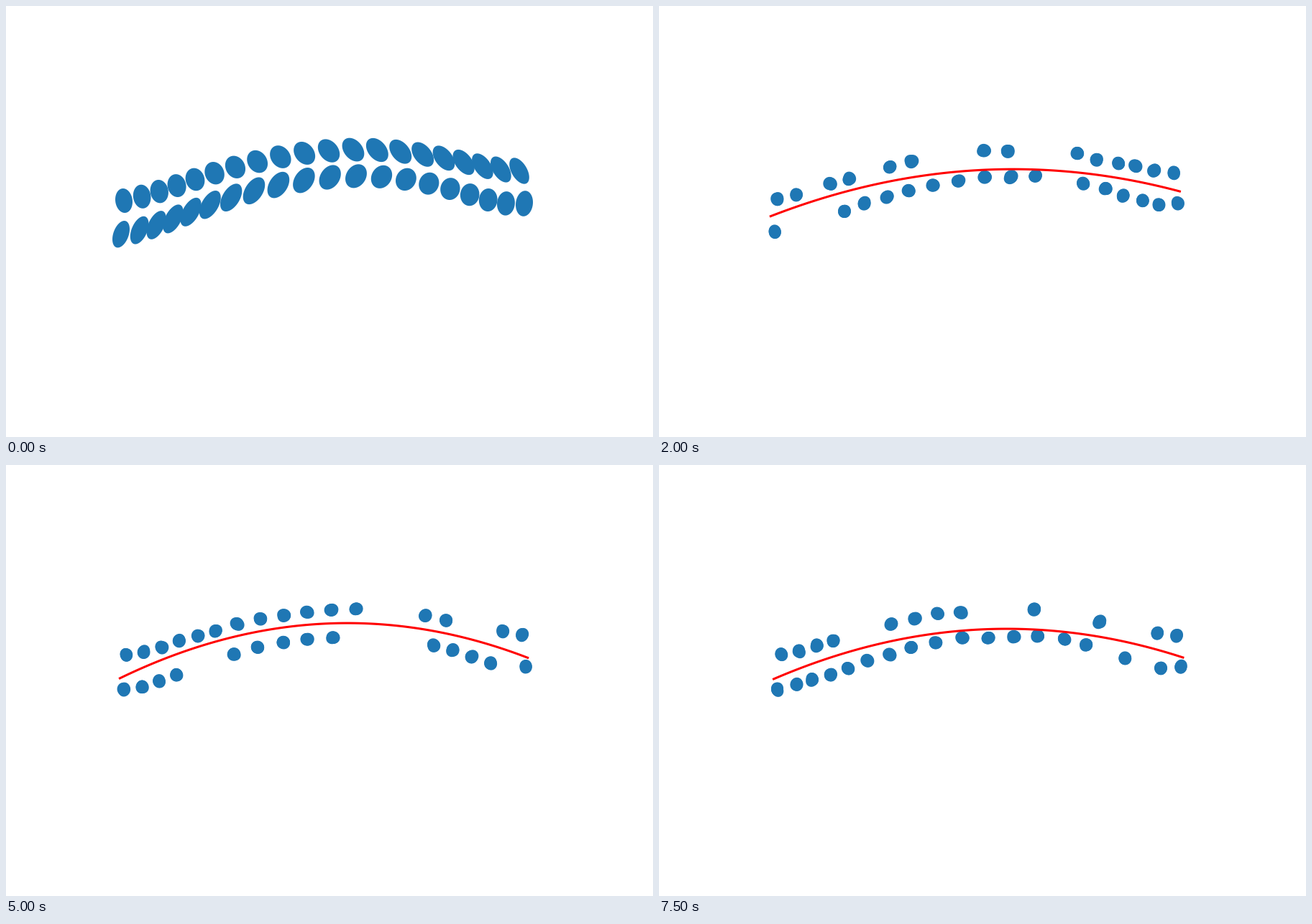
A matplotlib script that plays this animation: 900 by 600 pixels, repeating every 8000 ms.

```python
import numpy as np
import matplotlib.pyplot as plt
from matplotlib.animation import FuncAnimation
from matplotlib.collections import PolyCollection

W, H, DPI = 900, 600, 100
BLUE = "#1f77b4"
N = 20  # landmarks per row
THETA = np.linspace(0, 2 * np.pi, 60)


def through(*keys):
    """Smooth run of N values through evenly spaced key values."""
    s = np.linspace(-1, 1, len(keys))
    return np.polyval(np.polyfit(s, keys, len(keys) - 1), np.linspace(-1, 1, N))


# Mean landmark positions in pixels, y pointing down: upper row, lower row
X = np.r_[through(164, 257.8, 368.8, 496.4, 614.6, 714),
          through(160, 252, 365.1, 501.3, 623.5, 721)]
Y = np.r_[through(271, 243.2, 212.5, 200, 212.9, 229.5),
          through(317.7, 288.8, 252.2, 236.9, 256.2, 275)]
U = (X - 440) / 280

# Half-extents and correlation of the first, uncertain estimates
SX = np.r_[through(12, 14.2, 15.5, 13.8), through(12, 15.2, 14.5, 12)]
SY = np.r_[through(17, 15.7, 16.8, 18.2), through(18.7, 19.2, 15.8, 17.8)]
R = np.r_[through(0.1, 0.17, 0.4, 0.5), through(-0.38, -0.47, -0.14, -0.1)]

# One entry per view: camera turn, and how many of the ten gaps are in the upper row
TURN = [1, 9.7, 8, 1.5, 8, 11.3, 1.5, 15.8, 14, 5.7, 12, 18.8, 7, 9, 7.5]
TOP_GAPS = [5, 0, 4, 6, 5, 7, 3, 6, 5, 4, 6, 4, 5, 3, 8]
GAPS = 10


def ellipse(x, y, sx, sy, r):
    c, s = np.cos(THETA), np.sin(THETA)
    return np.column_stack([x + sx * c, y + sy * (r * c + np.sqrt(1 - r * r) * s)])


def view(turn, top_gaps, rng):
    """Visible landmarks seen by a camera turned a little, with noise."""
    inner = np.arange(1, N - 1)
    drop = np.r_[rng.choice(inner, top_gaps, replace=False),
                 rng.choice(inner, GAPS - top_gaps, replace=False) + N]
    x = X + 0.65 * turn + 0.9 - 1.3 * U**2 + rng.normal(0, 1, 2 * N)
    y = Y + turn * U + rng.normal(0, 1, 2 * N)
    return np.delete(x, drop), np.delete(y, drop)


def blobs(x, y, rng):
    """Each landmark is a few nearly coincident ellipses."""
    edge = np.abs(x - 445) / 280
    return [ellipse(px + ox, py + oy, 9.3 - 0.8 * e, 8.7 + 0.5 * e,
                    rng.uniform(-0.12, 0.12))
            for px, py, e in zip(x, y, edge)
            for ox, oy in rng.normal(0, 0.5, (3, 2))]


fig = plt.figure(figsize=(W / DPI, H / DPI), dpi=DPI, facecolor="white")
ax = fig.add_axes([0, 0, 1, 1])
ax.set_xlim(0, W)
ax.set_ylim(H, 0)
ax.axis("off")
dots = ax.add_collection(PolyCollection([], facecolors=BLUE, linewidths=0))
curve, = ax.plot([], [], color="red", lw=2.2, zorder=3)


def draw(k):
    if k == 0:
        dots.set_verts([ellipse(*p) for p in zip(X, Y, SX, SY, R)])
        curve.set_data([], [])
    else:
        rng = np.random.default_rng(40 + k)
        x, y = view(TURN[k - 1], TOP_GAPS[k - 1], rng)
        dots.set_verts(blobs(x, y, rng))
        xs = np.linspace(x.min() - 5.2, x.max() + 2.5, 100)
        curve.set_data(xs, np.polyval(np.polyfit(x, y, 2), xs))
    return dots, curve


anim = FuncAnimation(fig, draw, frames=len(TURN) + 1, interval=500, repeat=True,
                     repeat_delay=0, init_func=lambda: draw(0))
plt.show()
```
